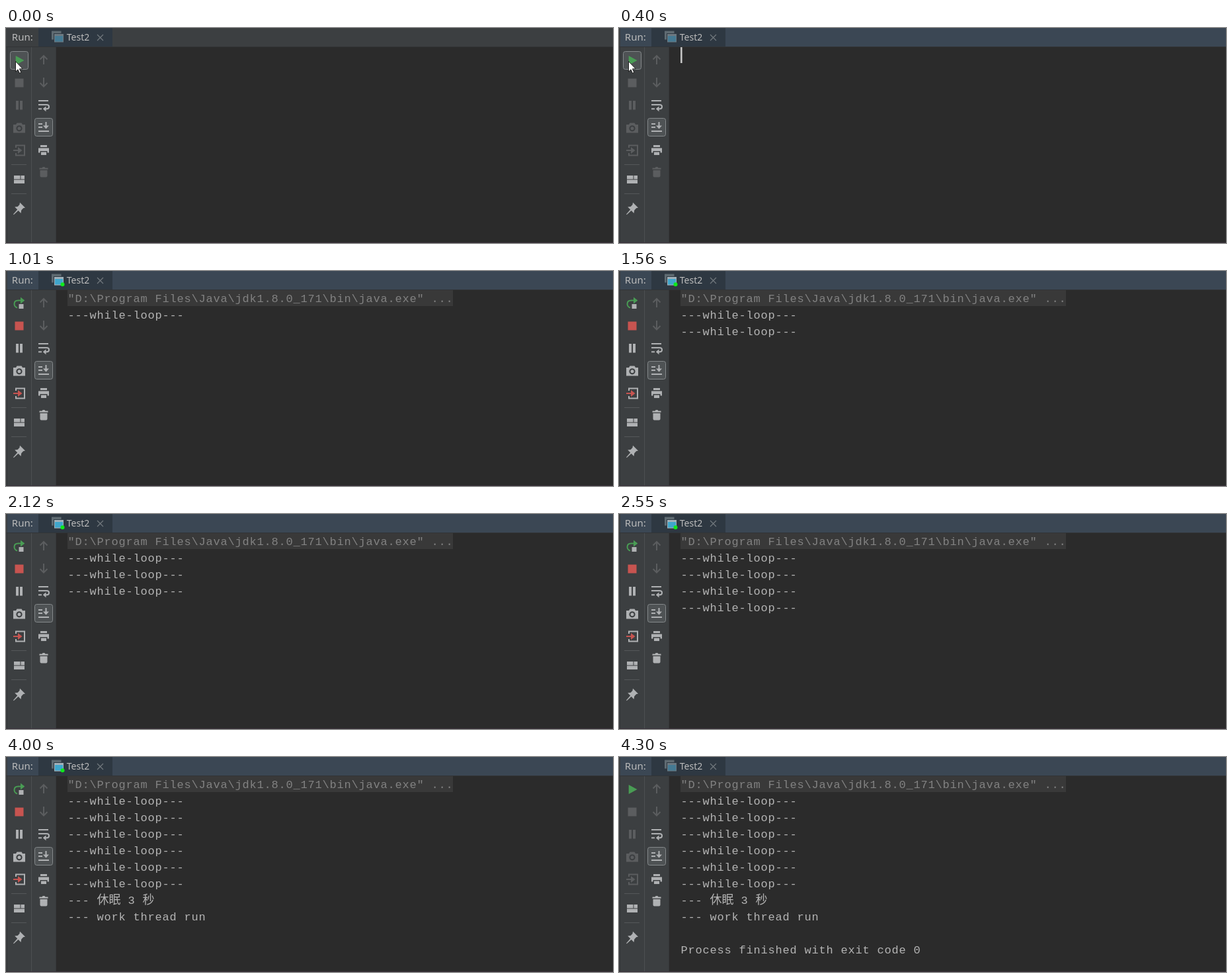
An HTML page that plays this animation: 918 px wide and 325 px high, repeating every 6050 ms.

```html
<!DOCTYPE html>
<html lang="en">
<head>
<meta charset="utf-8">
<title>Run console</title>
<style>
  html, body { margin: 0; width: 100%; height: 100%; overflow: hidden; background: #2b2b2b; }
  svg { display: block; width: 100%; height: 100%; }
  .ui { font-family: "Noto Sans", "Open Sans", sans-serif; fill: #bbb; }
  .mono {
    font: 17px "Liberation Mono", "Courier New", monospace;
    letter-spacing: calc(11px - 1ch);
    fill: #b4b4b4;
    white-space: pre;
  }
  .cjk { font: 300 18px "Noto Sans CJK SC", "Noto Sans CJK", sans-serif; letter-spacing: 0; }
  .icon { color: #afb1b3; fill: currentColor; }
  .dim { color: #5b5d5f; }
  .line { fill: none; stroke: currentColor; stroke-width: 2; }
  .box { fill: #4e5254; stroke: #85898b; }
  .red { color: #c75450; fill: currentColor; }
  .dim .red { color: inherit; }
  .green { color: #499c54; }
</style>
</head>
<body>
<svg viewBox="0 0 918 325" preserveAspectRatio="none">
  <rect width="918" height="325" fill="#2b2b2b"/>
  <rect width="76" height="325" fill="#3c3f41"/>
  <rect width="918" height="28" fill="#3c3f41"/>
  <rect data-show="400 6050" x="2" width="916" height="28" fill="#3b4754"/>
  <path d="M0 28.5H918M1.5 28V325" stroke="#323436"/>
  <path d="M38.5 29V325" stroke="#4d5052"/>
  <path d="M75.5 29V325" stroke="#353739"/>
  <path d="M0 324.5H918" stroke="#383039"/>

  <!-- header -->
  <rect x="49" width="112" height="28" fill="#2e3842"/>
  <text class="ui" x="8.8" y="19" font-size="15">Run:</text>
  <text class="ui" x="91.8" y="19" font-size="14">Test2</text>
  <path d="M138 10L147 19M147 10L138 19" stroke="#72797e" stroke-width="1.2"/>
  <path d="M69 4.5H83.5V8H72V17.5H69Z" fill="#5f6b72"/>
  <path d="M73 9H87V21.5H73Z" fill="#6d7981"/>
  <path d="M74 12H86V20.5H74Z" fill="#457a93"/>
  <g data-show="700 4150">
    <path d="M73 9H87V21.5H73Z" fill="#a3b1b9"/>
    <path d="M74 12H86V20.5H74Z" fill="#3fa6cc"/>
    <circle cx="85.5" cy="20.3" r="3" fill="#0fe81c"/>
  </g>

  <!-- run controls -->
  <rect class="box" data-show="0 700" x="6.5" y="35.5" width="27" height="27" rx="3"/>
  <rect class="box" data-show="860 1010" x="6.5" y="35.5" width="27" height="27" rx="3"/>
  <path class="icon green" data-hide="700 4150" d="M14.7 42L27.5 49L14.7 56Z"/>
  <g class="icon" data-show="700 4150">
    <path class="line green" d="M17 55.5A6.2 6.2 0 0 1 12.5 50Q12.5 44.6 18.5 44.6H23"/>
    <path class="icon green" d="M22 39.5L28.3 44.6L22 49.5Z"/>
    <rect x="19.5" y="50" width="7" height="7"/>
  </g>
  <g class="icon" data-lit="700 4150"><rect class="red" x="13.5" y="76.5" width="13" height="13"/></g>
  <path class="icon" data-lit="700 4300" d="M15 110H19V123.5H15ZM21 110H25V123.5H21Z"/>
  <g data-hide="700 860">
    <path class="icon" data-lit="860 4150" fill-rule="evenodd"
      d="M11 146H15L16.5 143.5H23.5L25 146H29V158.5H11ZM20 147.2A4.6 4.6 0 1 0 20 156.4A4.6 4.6 0 1 0 20 147.2ZM20 149.3A2.5 2.5 0 1 1 20 154.3A2.5 2.5 0 1 1 20 149.3Z"/>
    <g class="icon" data-lit="860 4150">
      <path class="line" d="M15 181V177.5H28V192.5H15V189"/>
      <path class="red" d="M11 184H18V180L24.5 185L18 190V186H11Z"/>
    </g>
  </g>
  <g id="lower">
    <path d="M8 206.5H31M8 250.5H31" stroke="#555759"/>
    <path class="icon" d="M12 223H21.5V228.5H12ZM22.5 223H28V228.5H22.5ZM12 229.5H28V235H12Z"/>
    <path class="icon" d="M21 263.7L29 271.7L26.2 272.3L23.2 275.5L22.5 280L18.6 276L11.7 282.3L11 281.6L17.2 274.6L13.2 270.6L17.7 270L20.5 267Z"/>
  </g>

  <!-- console controls -->
  <path class="icon dim line" d="M57 55V42.5M51.5 47.5L57 42L62.5 47.5"/>
  <path class="icon dim line" d="M57 75V88M51.5 83L57 88.5L62.5 83"/>
  <g class="icon">
    <path class="line" d="M49 110H64M49 116H61.5Q65 116 65 119Q65 122.3 61.5 122.3H59M49 122.3H54"/>
    <path d="M60.5 118.3V126.3L55.8 122.3Z"/>
  </g>
  <rect class="box" x="43.5" y="136.5" width="27" height="27" rx="3"/>
  <g class="icon">
    <path class="line" d="M49 145H55M49 150H55M49 156H65M60.5 142V150"/>
    <path d="M56 147.5H65L60.5 152.5Z"/>
  </g>
  <path class="icon" d="M52 177H62V180H52ZM49 181.5H65V188.5H62.5V186H51.5V188.5H49ZM53 187.5H61V192H53Z"/>
  <path class="icon" data-lit="700 6050" d="M50.5 211.5H54.5L55.5 210H58.5L59.5 211.5H63.5V213.7H50.5ZM51.5 215H62.5V223.5Q62.5 225.5 60.5 225.5H53.5Q51.5 225.5 51.5 223.5Z"/>

  <!-- console -->
  <rect data-show="400 700" x="93" y="29" width="2.6" height="24" fill="#c4c4c4"/>
  <g data-show="700 6050">
    <rect x="93" y="29" width="583" height="24" fill="#393939"/>
    <text class="mono" x="93.4" y="47" style="fill:#828282">"D:\Program Files\Java\jdk1.8.0_171\bin\java.exe" ...</text>
  </g>
  <g id="log"></g>

  <path data-show="0 1010" d="M14.5 50.5V66L18 62.8L20.4 68.3L22.8 67.2L20.4 61.8H25.2Z" fill="#fff" stroke="#111" stroke-width=".9"/>
</svg>
<script>
  const LOOP = 6050;
  const log = document.getElementById('log');
  const lower = document.getElementById('lower');

  function addLine(row, from, html) {
    const attrs = `class="mono" x="93.4" y="${47 + row * 25}" data-show="${from} ${LOOP}"`;
    log.insertAdjacentHTML('beforeend', `<text ${attrs}>${html}</text>`);
  }

  [1010, 1560, 2120, 2550, 3100, 3500].forEach((t, i) => addLine(i + 1, t, '---while-loop---'));
  addLine(7, 4000, '--- <tspan class="cjk">休眠</tspan> 3 <tspan class="cjk">秒</tspan>');
  addLine(8, 4000, '--- work thread run');
  addLine(10, 4300, 'Process finished with exit code 0');

  const spans = key => [...document.querySelectorAll(`[data-${key}]`)].map(el => {
    const [from, to] = el.dataset[key].split(' ').map(Number);
    return { el, active: t => t >= from && t < to };
  });
  const shown = spans('show'), hidden = spans('hide'), lit = spans('lit');
  const display = (el, on) => { el.style.display = on ? '' : 'none'; };

  function render(t) {
    for (const { el, active } of shown) display(el, active(t));
    for (const { el, active } of hidden) display(el, !active(t));
    for (const { el, active } of lit) el.classList.toggle('dim', !active(t));
    // the toolbar is shorter while the process is starting
    lower.setAttribute('transform', `translate(0 ${t >= 700 && t < 860 ? -68 : 0})`);
  }

  const start = performance.now();
  function tick() {
    render((performance.now() - start) % LOOP);
    requestAnimationFrame(tick);
  }
  tick();
</script>
</body>
</html>
```
